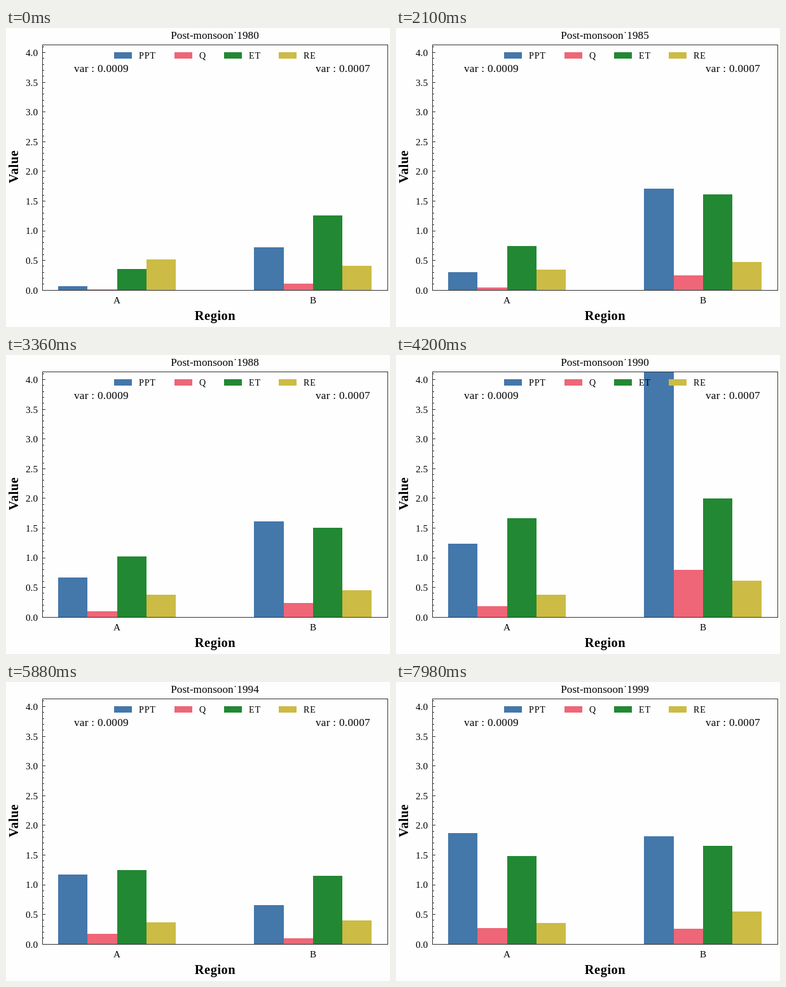
An HTML page that plays this animation: 604 px wide and 469 px high, repeating every 8000 ms.

```html
<!DOCTYPE html>
<html lang="en">
<head>
<meta charset="utf-8">
<title>Seasonal water balance</title>
<style>
  html, body { margin: 0; width: 100%; height: 100%; overflow: hidden; background: #fefefe; }
  svg { display: block; width: 604px; height: 469px; }
  text { font: 15.2px "Liberation Serif", "Times New Roman", serif; }
  .title { font-size: 17.2px; }
  .note { font-size: 17.2px; letter-spacing: .28px; }
  .key { font-size: 14.1px; letter-spacing: .8px; }
  .name { font-size: 20.5px; font-weight: bold; letter-spacing: .5px; }
  .mid { text-anchor: middle; }
  .end { text-anchor: end; }
  rect, path { shape-rendering: crispEdges; }
</style>
</head>
<body>
<svg id="chart" viewBox="0 0 604 469"></svg>
<script>
const LOOP = 8000, STEP = 420, FIRST = 1980;
const TOP = 26, BASE = 411, ZERO = 411.2, UNIT = 93.14;
const RUNOFF = .145;  // share of rain that becomes Q
const SERIES = [
  { name: 'PPT', color: '#4477aa', x: 170 },
  { name: 'Q', color: '#ee6677', x: 265 },
  { name: 'ET', color: '#228833', x: 343 },
  { name: 'RE', color: '#ccbb44', x: 429 }
];

// Key years: PPT, ET, RE of region A, then of region B
const KEYS = [
  { year: 0, v: [.07, .36, .52, .72, 1.26, .41] },
  { year: 3, v: [1.09, 1.57, .54, 1.1, 1.42, .6] },
  { year: 6, v: [.13, .44, .28, 1.89, 1.7, .39] },
  { year: 10, v: [1.24, 1.67, .38, 5.5, 2, .61] },
  { year: 12, v: [1.09, 1.09, .3, .46, .96, .37] },
  { year: 16, v: [1.38, 1.51, .35, .52, 1.14, .37] },
  { year: 19, v: [1.87, 1.48, .36, 1.82, 1.66, .55] }
];

const chart = document.getElementById('chart');
const yOf = value => ZERO - value * UNIT;

function add(tag, attrs, text = '') {
  const el = document.createElementNS('http://www.w3.org/2000/svg', tag);
  for (const k in attrs) el.setAttribute(k, attrs[k]);
  el.textContent = text;
  return chart.appendChild(el);
}
const label = (text, x, y, cls, more) => add('text', { x, y, class: cls, ...more }, text);

// Between key years: geometric blend, drawn halfway to the typical year, with some weather
function measured(year) {
  const n = KEYS.findIndex(k => k.year >= year);
  const b = KEYS[n], a = KEYS[n - 1];
  if (b.year === year) return b.v;
  const f = (year - a.year) / (b.year - a.year);
  return b.v.map((v, i) => {
    const trend = Math.log(a.v[i]) * (1 - f) + Math.log(v) * f;
    const typical = KEYS.reduce((sum, k) => sum + Math.log(k.v[i]), 0) / KEYS.length;
    const weather = .3 * Math.sin(year * 7.3 + (i < 3 ? 0 : 2)) / (1 + i % 3 * 2);
    return Math.exp((trend + typical) / 2 + weather);
  });
}

function valuesFor(year) {
  const v = measured(year);
  return [0, 3].flatMap(i => [v[i], v[i] * RUNOFF, v[i + 1], v[i + 2]]);
}

const bars = Array.from({ length: 8 }, (_, i) => {
  const edge = n => Math.round((i < 4 ? 82 : 390.3) + 46.25 * n);
  const x = edge(i % 4);
  return add('rect', { x, width: edge(i % 4 + 1) - x, fill: SERIES[i % 4].color });
});

// Frame, ticks and axis numbers
let lines = 'M57.5 26.5H600.5V411.5H57.5Z';
for (let i = 0; i <= 41; i++) {
  lines += `M57.5 ${Math.floor(yOf(i / 10)) + .5}h${i % 5 ? 2 : 4}`;
}
add('path', { d: lines, fill: 'none', stroke: '#333' });
for (let v = 0; v <= 4; v += .5) label(v.toFixed(1), 50, yOf(v) + 5.3, 'end');

for (const { name, color, x } of SERIES) {
  add('rect', { x, y: 38, width: 28, height: 10, fill: color });
  label(name, x + 39, 48, 'key');
}

const title = label('', 328.5, 17, 'title mid');
label('var : 0.0009', 107, 69, 'note');
label('var : 0.0007', 487, 69, 'note');
label('A', 174.5, 432, 'mid');
label('B', 483, 432, 'mid');
label('Region', 329, 458, 'name mid');
label('Value', 0, 0, 'name mid', { transform: 'translate(19 217.5) rotate(-90)' });

function draw(now) {
  const year = Math.floor(now % LOOP / STEP);
  title.textContent = 'Post-monsoon˙' + (FIRST + year);
  valuesFor(year).forEach((value, i) => {
    const y = Math.max(TOP, Math.round(yOf(value)));
    bars[i].setAttribute('y', y);
    bars[i].setAttribute('height', BASE - y);
  });
}

const start = performance.now();
function tick() {
  draw(performance.now() - start);
  requestAnimationFrame(tick);
}
tick();
</script>
</body>
</html>
```
